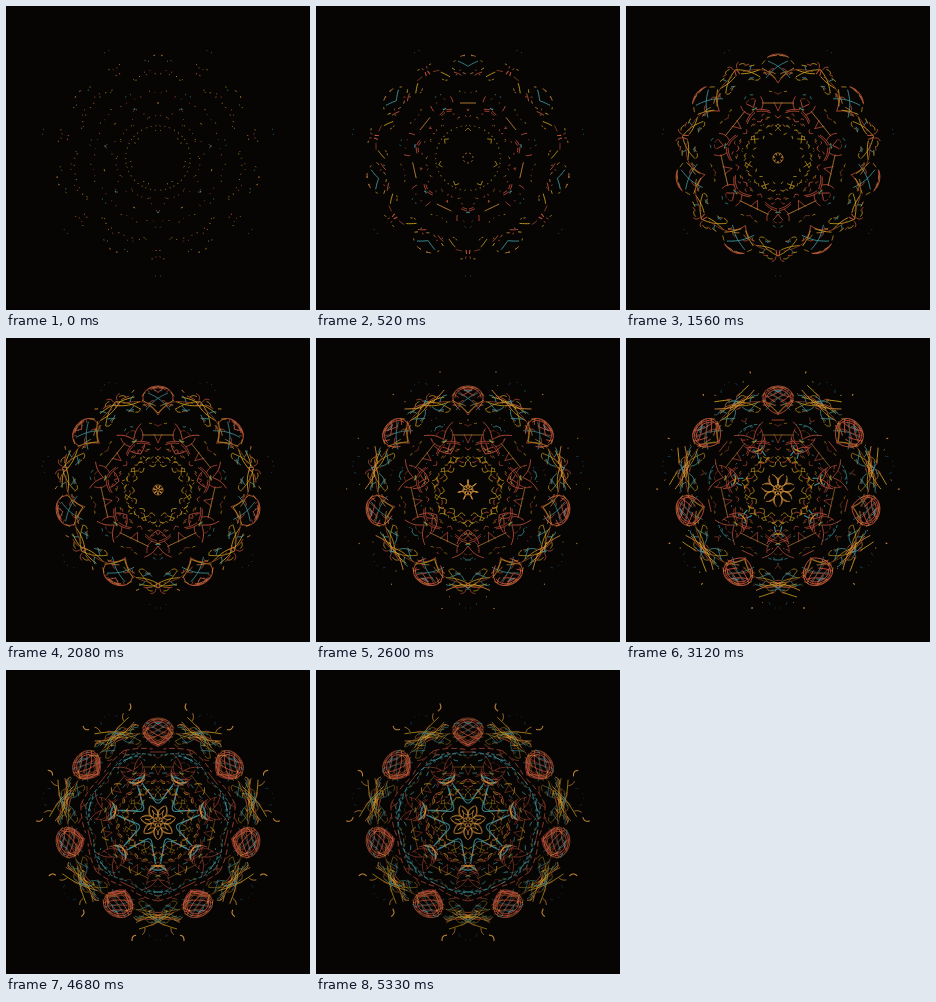
Write an HTML page with a canvas that moves like this. It is 304 px wide and 304 px high and loops after 5.46 s.

```html
<!DOCTYPE html>
<html lang="en">
<head>
<meta charset="utf-8">
<title>Sevenfold bloom</title>
<style>
  html, body { margin: 0; width: 100%; height: 100%; overflow: hidden; background: #060503; }
  canvas { display: block; width: 304px; height: 304px; }
</style>
</head>
<body>
<canvas id="stage" width="304" height="304"></canvas>
<script>
const ctx = document.getElementById('stage').getContext('2d');
const STEP = 130, STEPS = 42, FOLD = 7, HALF = Math.PI / FOLD;
const GOLD = '#cfa31c', RED = '#cb5440', TEAL = '#459ba3', TAN = '#d3913d',
      BLUE = '#1c5274', RUST = '#8f4128';
const { sin, cos, PI } = Math;
const strokes = [];

let seed = 41;
const rnd = (a = 0, b = 1) => {
  seed = (seed * 16807) % 2147483647;
  return a + (b - a) * seed / 2147483647;
};
const pick = list => list[Math.floor(rnd(0, list.length))];
const times = (n, fn) => { for (let i = 0; i < n; i++) fn(i); };
const polar = (r, a) => [r * sin(a), r * cos(a)];

// fn maps 0..1 to [sideways, distance from the centre] along a symmetry axis.
function trace(turn, color, from, span, fn, width = 0.85) {
  const path = new Path2D(), n = 16;
  let [x, y] = fn(0), len = 0;
  path.moveTo(x, y);
  times(n, i => {
    const [u, v] = fn((i + 1) / n);
    path.lineTo(u, v);
    len += Math.hypot(u - x, v - y);
    [x, y] = [u, v];
  });
  strokes.push({ turn, color, from, to: from + span, path, len, width });
}
const spike = (...args) => trace(0, ...args);
const dome = (...args) => trace(HALF, ...args);

// A line from p to q, bowed sideways in the middle.
const bow = ([x, y], [u, v], bend = 0) => t => {
  const k = bend * sin(PI * t) / Math.hypot(u - x, v - y);
  return [x + (u - x) * t + (y - v) * k, y + (v - y) * t + (u - x) * k];
};

// Curling trails seeded in one half sector.
function wander(count, r0, r1, colors, from0, from1, size) {
  times(count, () => {
    const a = rnd(0.02, HALF - 0.02), dir = -a + pick([0, PI]) + rnd(-0.8, 0.8);
    const [x, y] = polar(rnd(r0, r1), a), len = rnd(0.5, 1) * size;
    const end = [x + len * cos(dir), y + len * sin(dir)];
    const bend = rnd(-0.25, 0.25) * len;
    trace(0, pick(colors), Math.round(rnd(from0, from1)), rnd(8, 15), bow([x, y], end, bend));
  });
}

// A broken ring from the spike axis to the dome axis.
function dashes(color, rSpike, rDome, n, from, span) {
  const at = t => polar(rSpike + (rDome - rSpike) * t, HALF * t);
  times(n, i => spike(color, from + span * i / n, 5, t => at((i + 0.65 * t) / n)));
}

// Woven baskets on the dome axes
const drop = (size, a) => [17 * size * sin(a) * cos(a / 2) ** 0.4, 90 + 14 * size * cos(a)];
dome(TEAL, 0, 10, bow([10, 97], [-12, 80], -2));
dome(RED, 0, 9, bow([14, 86], [0, 75], -2));
dome(GOLD, 2, 12, bow([16, 90], [0, 77], -1));
dome(TAN, 0, 6, bow([3, 103], [10, 101]));
times(3, i => dome(RED, 8 + 5 * i, 15, t => drop(1 - 0.13 * i, PI * t)));
times(5, i => {
  const a = 0.4 + 0.35 * i;
  dome(i % 2 ? RUST : RED, 11 + 3 * i, 14, bow(drop(1, a), drop(1, -a - 1), 2));
});
dome(RED, 20, 5, bow([0, 70], [8, 70]));

// Crossed arms and tips on the spike axes
times(5, i => {
  const lift = i / 2 - 1;
  spike(i === 3 ? TAN : GOLD, 5 * i, 10,
    bow([19 + i % 2 * 3, 94 + 13 * lift], [-4 * i, 94 - 4 * lift], i % 2 ? 2 : -2));
});
spike(RED, 0, 6, bow([2, 92], [1, 98]), 1.1);
spike(RUST, 1, 13, bow([6, 93], [31, 81], 2));
spike(TEAL, 22, 10, bow([1, 98], [9, 88], 2));
spike(BLUE, 0, 2, bow([2, 118], [3, 118]), 1.1);
spike(BLUE, 14, 8, bow([8, 115], [9, 112]));
spike(TAN, 20, 18, bow([26, 119], [21, 113], 2), 1.1);
spike(TAN, 22, 12, bow([16, 113], [13, 106], -1));

// Toothed ring, short-lived bars and hooks
times(2, i => spike(RED, i, 9, bow([1, 53 - 2 * i], [13, 46 - 2 * i], 1)));
dome(RED, 2, 8, bow([0, 47], [4, 56]));
dome(TAN, 0, 8, bow([0, 55], [16, 55]));
spike(RED, 0, 9, bow([11, 63], [6, 51], 2));
spike(RED, 9, 8, bow([0, 56], [16, 68], 2));
spike(TEAL, 0, 5, bow([0, 54], [2, 55]), 1.1);

// Lattices and eyes between the rings
times(5, i => spike([RED, RED, GOLD, TEAL, TAN][i], 10 + 4 * i, 10,
  bow([-2 * i, 40 + 2 * i], [11 - i, 54 - 2.5 * i], i % 2 ? 2 : -2)));
const eye = a => [13 * sin(a), 64 + 6 * cos(a)];
times(3, i => spike(TEAL, 17 + 3 * i, 5, t => eye((i + 0.75 * t) * PI / 6)));
times(2, i => spike(RED, 18 + 4 * i, 6, t => eye((i + 4 + 0.75 * t) * PI / 6)));

// Heptagonal bands
dashes(TEAL, 74, 66, 6, 24, 10);
dashes(TEAL, 70, 70, 4, 31, 8);
dashes(RED, 79, 72, 4, 26, 10);

// Inner wreath
dome(GOLD, 0, 8, bow([-3, 27], [3, 33]));
times(3, i => {
  const a = HALF * (i + 0.5) / 3;
  spike(i % 2 ? TAN : GOLD, 0, 10, bow(polar(32, a), polar(34, a + 0.08)));
});
spike(GOLD, 9, 9, bow([3, 26], [10, 26], -3));
spike(GOLD, 12, 10, bow([1, 37], [6, 33], -1));

// Flower, and the seven-armed star around it
times(2, i => spike(TAN, 2 + 7 * i, 6, t => polar(5 - i * 4 * t, HALF * t * (1 - i))));
spike(TAN, 16, 9, t => [4.5 * sin(PI * t), 3 + 15 * t]);
dome(TAN, 18, 9, t => [6 * t * t, 7 + 9 * t]);
spike(TAN, 26, 8, bow([0, 13], [3, 6], -1));
times(2, i => spike(TEAL, 22 + 5 * i, 9,
  t => polar(19 + 3 * i + (23 - 6 * i) * (1 - t) ** 2.5, 0.06 + (HALF - 0.06) * t), 1.1 - 0.3 * i));

// Loose threads filling the bands
wander(9, 80, 103, [GOLD, GOLD, TAN, RED], 0, 0, 8);
wander(8, 40, 78, [RED, TEAL, RUST, GOLD], 0, 0, 5);
wander(6, 80, 100, [GOLD, RED, RED, TEAL], 7, 18, 14);
wander(6, 24, 56, [GOLD, RED, TEAL], 9, 26, 7);
wander(6, 78, 101, [GOLD, RED, TAN, RUST], 17, 28, 13);
wander(5, 77, 102, [GOLD, RUST, TEAL], 27, 36, 11);
wander(5, 22, 58, [GOLD, GOLD, RED], 26, 36, 8);
wander(3, 62, 77, [TEAL, RED], 30, 37, 9);

function draw(step) {
  ctx.setTransform(1, 0, 0, 1, 0, 0);
  ctx.globalAlpha = 1;
  ctx.fillStyle = '#060503';
  ctx.fillRect(0, 0, 304, 304);
  for (const s of strokes) {
    if (s.from > step) continue;
    const grown = Math.min(1, (step - s.from) / (s.to - s.from));
    const age = Math.min(1, Math.max(0, (step - s.to) / 28));
    ctx.globalAlpha = 0.95 - 0.5 * age;
    ctx.strokeStyle = s.color;
    ctx.lineWidth = s.width;
    ctx.setLineDash([Math.max(1, s.len * grown), 999]);
    times(2 * FOLD, k => {
      const a = s.turn + HALF * (k - k % 2), side = k % 2 ? -1 : 1;
      ctx.setTransform(side * cos(a), side * sin(a), -sin(a), cos(a), 152, 152);
      ctx.stroke(s.path);
    });
  }
}

let last = -1;
function tick() {
  const step = Math.floor(performance.now() / STEP) % STEPS;
  if (step !== last) draw(last = step);
  requestAnimationFrame(tick);
}
tick();
</script>
</body>
</html>
```
